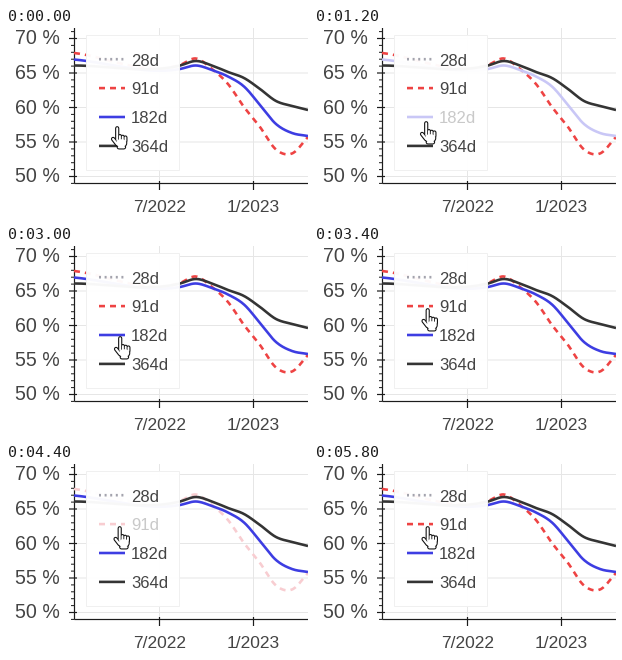
A matplotlib script that plays this animation: 302 by 190 pixels, repeating every 6 s.

```python
import matplotlib.pyplot as plt
from matplotlib.animation import FuncAnimation
from matplotlib.patches import Rectangle
import numpy as np

W, H, DPI = 302, 190, 100
STEP, FRAMES = 200, 30
PT = 72 / DPI
FONT = "Liberation Sans"
INK, AXIS, GRID, FADED = "#444444", "#1c1c1c", "#e6e6e6", "#c9c9c9"
LEFT, BOTTOM, TOP, ROW = 68.5, 155.5, 10.5, 34.5
STROKE = 2.6

fig = plt.figure(figsize=(W / DPI, H / DPI), dpi=DPI, facecolor="white")
ax = fig.add_axes([0, 0, 1, 1])
ax.set(xlim=(0, W), ylim=(H, 0))
ax.axis("off")


def line(x, y, color, width=1.0, z=1, cap="butt", **kw):
    return ax.plot(x, y, color=color, lw=width * PT, zorder=z, snap=False,
                   solid_capstyle=cap, dash_capstyle="butt", **kw)[0]


def label(x, y, text, px, ha="left", z=3):
    return ax.text(x, y, text, fontsize=px * PT, family=FONT, color=INK,
                   ha=ha, va="baseline", zorder=z)


def smooth(x, y, n=240):
    """Cubic Hermite curve through the knots."""
    slope = np.gradient(y, x)
    xs = np.linspace(x[0], x[-1], n)
    i = np.clip(np.searchsorted(x, xs) - 1, 0, len(x) - 2)
    h = x[i + 1] - x[i]
    t = (xs - x[i]) / h
    s = t * t * (3 - 2 * t)
    ys = (y[i] * (1 - s) + y[i + 1] * s
          + h * t * (1 - t) * (slope[i] * (1 - t) - slope[i + 1] * t))
    return xs, ys


def draw_axes():
    line([LEFT, LEFT], [0, BOTTOM], AXIS, 1.2, 4)
    line([LEFT, W], [BOTTOM, BOTTOM], AXIS, 1.2, 4)
    for i in range(-1, 22):
        y = TOP + i * ROW / 5
        if i % 5 == 0:
            line([LEFT, W], [y, y], GRID)
            line([63, 71], [y, y], AXIS, 1.2, 4)
            label(54, y + 6, f"{70 - i} %", 19.6, "right")
        else:
            line([65, LEFT], [y, y], AXIS, 1, 4)
    for x, text in ((153.5, "7/2022"), (247.5, "1/2023")):
        line([x, x], [0, BOTTOM], GRID)
        line([x, x], [153, 162], AXIS, 1.2, 4)
        label(x, 184, text, 17.4, "center")


# Knots sit at the left axis, then every 16 px from the legend's edge
KNOTS = np.r_[68, np.arange(174, 303, 16)].astype(float)
SERIES = {
    "28d": ("#a3a3ad", (2, 3.6), None),
    "91d": ("#ee4343", (6, 5),
            [25, 37, 30.5, 41, 56, 79, 99, 121.5, 125.5, 109]),
    "182d": ("#3d3de2", None,
             [31.5, 41, 37.5, 42, 48.5, 58.5, 77, 96, 105, 108]),
    "364d": ("#343434", None,
             [37.5, 37.5, 33, 37.5, 44, 50, 61, 73, 78, 82]),
}
MUTED = {"182d": ("#c9c7f6", 1200, 3000), "91d": ("#f8cdd1", 4200, 5600)}


def draw_series():
    ax.add_patch(Rectangle((80.5, 7.5), 93, 135, fc="white", ec="#f0f0f0",
                           lw=PT, alpha=0.97, zorder=6, snap=False))
    parts = {}
    for i, (name, (color, dash, knots)) in enumerate(SERIES.items()):
        y = 31.2 + 28.9 * i
        style = (0, tuple(d / STROKE for d in dash)) if dash else "-"
        key = line([93, 119], [y, y], color, STROKE, 7, ls=style)
        text = label(125, y + 6.3, name, 16.6, z=7)
        lines = [key]
        if knots:
            xs, ys = smooth(KNOTS, np.array(knots, float))
            lines.append(line(xs, ys, color, STROKE, 5, ls=style))
        parts[name] = lines, text
    return parts


def hand_strokes():
    """Pointer as strokes (x0, y0, x1, y1, width) from its top left corner."""
    yield 6.7, 2.2, 6.7, 14, 2.0
    for k in (1, 2, 3):
        x = 6.7 + 2.75 * k
        yield x, 9.3 + 0.7 * k, x, 15, 1.9
    yield 2.6, 13, 6.5, 18, 2.2
    yield 9.5, 17, 12, 17, 7.5
    yield 8.4, 21.2, 13.4, 21.2, 2.4


draw_axes()
parts = draw_series()
hand = []
for x0, y0, x1, y1, width in hand_strokes():
    for z, color, extra in ((9, "#111111", 2.2), (10, "white", 0)):
        stroke = line([], [], color, width + extra, z, "round")
        hand.append((stroke, np.array([x0, x1]), np.array([y0, y1])))

# Time and place of each pointer jump
POSES = [(0, 104.5, 98), (200, 105.5, 93), (3000, 107.5, 90),
         (3200, 105.5, 79), (3400, 107, 62)]


def update(frame):
    t = frame * STEP
    _, px, py = [p for p in POSES if p[0] <= t][-1]
    for stroke, xs, ys in hand:
        stroke.set_data(xs + px, ys + py)
    for name, (pale, start, end) in MUTED.items():
        off = start <= t < end
        lines, text = parts[name]
        for item in lines:
            item.set_color(pale if off else SERIES[name][0])
        text.set_color(FADED if off else INK)
    return [stroke for stroke, _, _ in hand]


anim = FuncAnimation(fig, update, frames=FRAMES, interval=STEP, repeat=True,
                     repeat_delay=0, blit=False)
plt.show()
```
